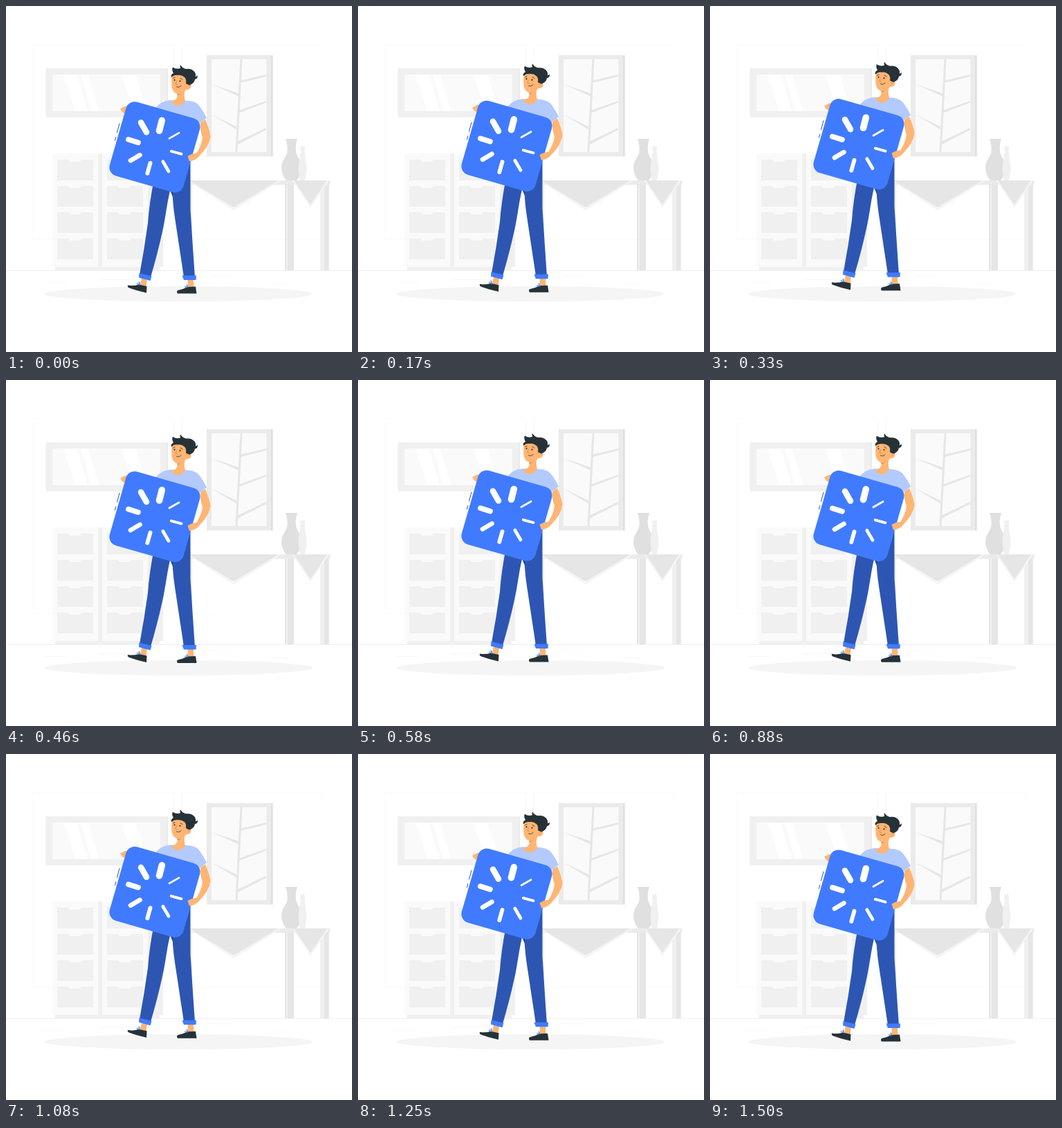
An HTML page for the animation above (1.54 s loop, 500 by 500 pixels).

```html
<!DOCTYPE html>
<html lang="en">
<head>
<meta charset="utf-8">
<title>Carrying a tile</title>
<style>
  html, body { margin: 0; width: 100%; height: 100%; overflow: hidden; background: #fff; }
  svg { display: block; width: 100vw; height: 100vh; }
  .line { fill: none; stroke-linecap: round; }
</style>
</head>
<body>
<svg viewBox="0 0 500 500">
  <defs>
    <path id="drawer" d="M0 0H16L18 3H33L35 0H52V30H0Z" fill="#f0f0f0"/>
    <g id="column">
      <use href="#drawer" y="222"/><use href="#drawer" y="260"/>
      <use href="#drawer" y="298"/><use href="#drawer" y="336"/>
    </g>
  </defs>

  <!-- Wall and floor -->
  <g fill="none" stroke="#fafafa">
    <rect x="39.5" y="55.5" width="203" height="282" rx="2"/>
    <rect x="254.5" y="55.5" width="203" height="282" rx="2"/>
  </g>
  <path d="M0 382.5H500" stroke="#f0f0f0"/>
  <path d="M295 390H327M135 395.5H193M53 399.5H88M383 402H408" stroke="#f5f5f5" stroke-width=".7"/>

  <!-- Wide picture -->
  <path d="M57.5 90H234V161H57.5Z" fill="#f0f0f0"/>
  <path d="M232.500 90H234V161H232.500Z" fill="#e8e8e8"/>
  <path d="M67 99H223V152H67Z" fill="#fafafa"/>
  <path d="M83 99H102L118 152H100ZM108 99H119L134 152H123ZM167 99H187L204 152H184Z" fill="#fff"/>

  <!-- Tall picture -->
  <path d="M290 71H385.500V217.500H290Z" fill="#ebebeb"/>
  <path d="M383 71H385.500V217.500H383Z" fill="#e0e0e0"/>
  <path d="M297 77H376.500V211H297Z" fill="#fafafa"/>
  <path d="M338.500 77H341.500L334.500 211H331.500ZM338 108 376 99V102L337 111.500ZM297 113 336 126V130.500ZM336 151 376 137V139.500L335 155ZM297 157 333 174V178.500ZM334 196 376 176V179L333 201Z" fill="#e6e6e6"/>

  <!-- Cabinet -->
  <path d="M71 377H222V382H71Z" fill="#f0f0f0"/>
  <path d="M67 213H205V377H67Z" fill="#fafafa"/>
  <path d="M133 213H139V377H133ZM205 213H227V377H205Z" fill="#f0f0f0"/>
  <use href="#column" x="74"/><use href="#column" x="146"/>

  <!-- Table -->
  <path d="M403 258H416V382H403ZM454 258H466.500V382H454ZM256 258H269V382H256Z" fill="#f0f0f0"/>
  <path d="M403 258H405V382H403ZM407 258H416V382H407ZM460 258H466.500V382H460Z" fill="#e6e6e6"/>
  <path d="M256 252H468.500V258.500H256Z" fill="#ebebeb"/>
  <path d="M262 252H398L329 295.500ZM414 252H467L440 291.500Z" fill="#f5f5f5"/>
  <path d="M264 252H394L329 291ZM416 252H464L440 287.500Z" fill="#e6e6e6"/>
  <path d="M404 192H421Q418 200 419 210C420 219 427 222 427 233Q427 244 420 252H405Q398 244 398 233C398 222 406 219 406.500 210Q407 200 404 192Z" fill="#e0e0e0"/>
  <path d="M425 203H432Q431 213 433 221Q436 237 432 252H425Q421 237 424 221Q426.500 213 425 203Z" fill="#f0f0f0"/>

  <ellipse cx="249.500" cy="416" rx="194" ry="11" fill="#f5f5f5"/>

  <g id="man">
    <!-- Feet -->
    <g fill="#ffb573">
      <path d="M196 393 204 395 202.500 406 194 404Z"/>
      <path d="M262.500 395H271L271.500 407H263Z"/>
    </g>
    <g fill="#263238">
      <path d="M176 403.500Q184 405 192 402.500L203.500 405 203 414.500Q188 411 177 407Q175 405 176 403.500Z"/>
      <path d="M248 411Q256 409.500 262 406L274 405.500 275.500 415.500H248Q246 413 248 411Z"/>
    </g>
    <path class="line" d="M193 403C187 402 188 399 193 402Q191 397 193 399L194 403M262 407C257 407 257 404 262 406Q260 402 262 403L263 407" stroke="#407bff" stroke-width=".8"/>

    <!-- Legs -->
    <g fill="#2d56b3">
      <path d="M240 215H266.500V294Q270 350 273 392H257Q251 352 244 306Q240 280 240 250Z"/>
      <path d="M214 250 242 255 237 267C232 288 230 310 226 326Q219 358 209 392L193 388Q200 350 205 314Q207 285 214 250Z"/>
    </g>
    <path d="M237 266 238.500 261H241V276Z" fill="#24458f"/>
    <path d="M192.500 386 210.500 390.500 208.500 397 192 392.500ZM254.500 389.500H275L274.500 396H257Z" fill="#407bff"/>

    <!-- Torso and head -->
    <path d="M215 149Q223 137 238 136L260 136.500Q275 137 280 145Q286 153 290 162L280 169 266 222H220Z" fill="#b3caff"/>
    <path d="M248 120 260 118Q256 128 259 137Q256 144 247 144Q241 143 239 138Q247 136 247.500 130Z" fill="#ffb573"/>
    <path d="M247.500 127Q253 127 257 121L251 128 247.500 129Z" fill="#d58745"/>
    <path d="M240 100Q251 94 261 103V111Q267 111 267.500 116Q267 121 260 121Q256 127.500 249 127.500Q241 126 239.500 117Q238.500 108 240 100Z" fill="#ffb573"/>
    <path d="M239 103Q237.500 99 242 97Q239 92 241 88.500Q246 92 252 90Q251 87 252 85Q255 90 260 91Q269 90 273 96Q275 100 273.500 102Q276 102 276.500 100Q278 105 273 106Q272 112 265 114.500L260 112Q261 106 258 103Q253 99 248 100Q243 99 239 103Z" fill="#263238"/>
    <g fill="#263238">
      <ellipse cx="243.500" cy="107" rx=".9" ry="1.200"/>
      <ellipse cx="251.500" cy="108.500" rx=".9" ry="1.200"/>
    </g>
    <path class="line" d="M241.500 104.500 244 103.500M252 104.500Q254 104.500 255 106.500M246.500 117Q250 119 253 115.500" stroke="#263238" stroke-width=".8"/>
    <path class="line" d="M246.500 108 245 113 247.500 113.500M263 116Q264 114 266 114" stroke="#d58745" stroke-width=".8"/>

    <!-- Tile -->
    <path d="M165 148.500 173 144.500 181 147 174 158 170 154Q168 154 165 148.500Z" fill="#ffb573"/>
    <rect x="159.500" y="148.500" width="111" height="111" rx="13" transform="rotate(16 215 204)" fill="#407bff"/>
    <path class="line" d="M164 170 160.500 183M158.800 189.500 157.500 194.500" stroke="#2d56b3"/>
    <g id="rays" class="line" stroke="#fff">
      <path d="M225.300 165.500 221.500 180.500" stroke-width="9.600"/>
      <path d="M195 168.500 203 182.500" stroke-width="8.500"/>
      <path d="M176.800 193 191 197.500" stroke-width="7.600"/>
      <path d="M180 223.500 193.500 215.500" stroke-width="6.600"/>
      <path d="M208.500 227 204.300 242" stroke-width="5.800"/>
      <path d="M226.800 225 235 239" stroke-width="4.800"/>
      <path d="M238.800 210 253.500 214" stroke-width="3.900"/>
      <path d="M236 191.500 250 183.500" stroke-width="2.800"/>
    </g>

    <!-- Front arm -->
    <path d="M281 168.500 288 164Q295 181 295.500 189Q293 203 280 216Q275 223 265 224.500L262.500 217Q268 213 275.500 212.500Q283 200 284 190Q280 180 281 168.500Z" fill="#ffb573"/>
  </g>
</svg>
<script>
  const LOOP = 1540, LOWEST = 1485, RISE = 8.6;
  const man = document.getElementById("man");

  function draw(now) {
    const phase = 2 * Math.PI * (now % LOOP - LOWEST) / LOOP;
    const y = -RISE * (1 - Math.cos(phase)) / 2;
    man.setAttribute("transform", `translate(0 ${y.toFixed(3)})`);
  }

  let start;
  function tick(now) {
    start ??= now;
    draw(now - start);
    requestAnimationFrame(tick);
  }
  draw(0);
  requestAnimationFrame(tick);
</script>
</body>
</html>
```
